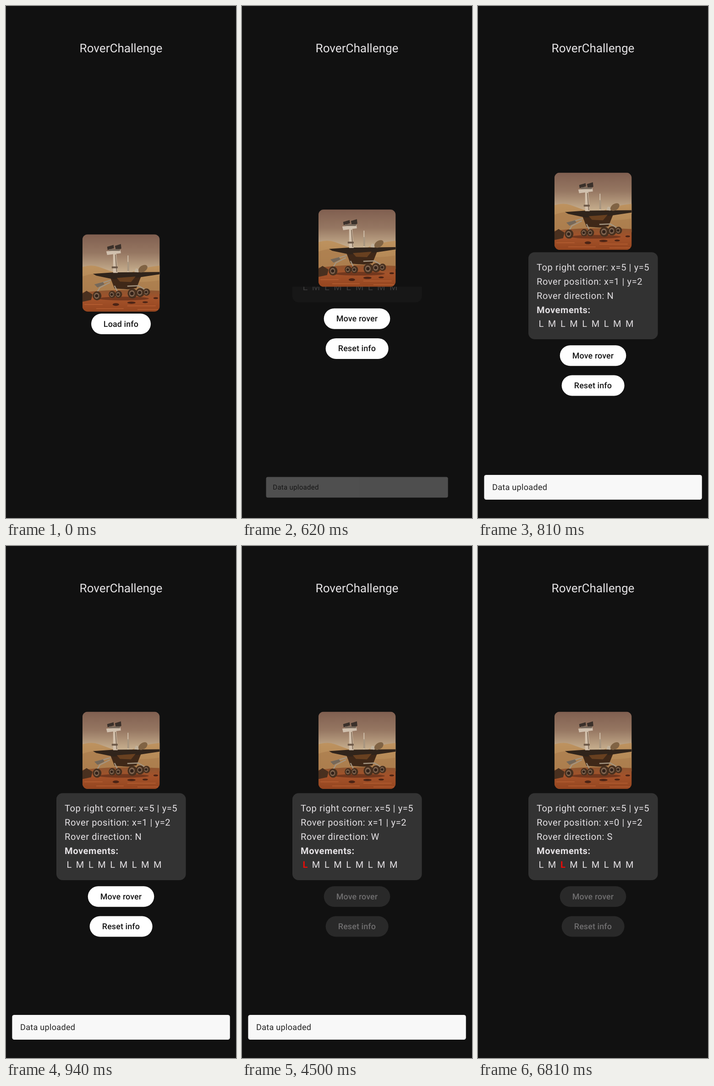
Animation of 502x1117 px, one loop 8000 ms. Source, as an HTML page:

```html
<!DOCTYPE html>
<html lang="en">
<head>
<meta charset="utf-8">
<title>Rover</title>
<style>
  html, body { margin: 0; width: 100%; height: 100%; overflow: hidden; background: #111; }
  svg { display: block; }
  text { font-family: Roboto, sans-serif; white-space: pre; text-rendering: geometricPrecision; }
  .title { font-size: 26.1px; fill: #e4e2e4; text-anchor: middle; }
  .info text { font-size: 20px; letter-spacing: .62px; fill: #e5e2e5; }
  .info .bold { font-weight: 700; }
  .info .active { font-weight: 700; fill: #ec0b08; }
  .button rect { fill: #fff; }
  .button text { font-size: 17.9px; font-weight: 500; letter-spacing: .12px; text-anchor: middle; fill: #161616; }
  .button.disabled rect { fill: #292929; }
  .button.disabled text { fill: #6f6e6f; }
  .snack rect { fill: #f8f8f8; }
  .snack text { font-size: 18px; letter-spacing: .32px; fill: #222; }
</style>
</head>
<body>
<svg width="100%" height="100%" viewBox="0 0 502 1117">
  <defs>
    <linearGradient id="sky" x2="0" y2="1">
      <stop offset="0" stop-color="#805f50"/>
      <stop offset=".45" stop-color="#967762"/>
      <stop offset="1" stop-color="#d0b996"/>
    </linearGradient>
    <linearGradient id="sand" x2="0" y2="1">
      <stop offset="0" stop-color="#bd925f"/>
      <stop offset="1" stop-color="#b08350"/>
    </linearGradient>
    <linearGradient id="soil" x2="0" y2="1">
      <stop offset="0" stop-color="#8d5530"/>
      <stop offset=".4" stop-color="#a4522a"/>
      <stop offset="1" stop-color="#94451f"/>
    </linearGradient>
    <clipPath id="frame"><rect width="168.5" height="168.5" rx="11.5"/></clipPath>
  </defs>

  <text class="title" x="251" y="101">RoverChallenge</text>

  <g id="photo"><g clip-path="url(#frame)">
    <rect width="169" height="90" fill="url(#sky)"/>
    <path d="M0 71Q20 65 36 71T70 83L105 84Q130 72 169 68V130H0Z" fill="url(#sand)"/>
    <path d="M0 92Q35 78 70 94T169 100V130H0Z" fill="#a87b4b" opacity=".6"/>
    <path d="M0 127Q60 118 169 123V169H0Z" fill="url(#soil)"/>
    <path d="M0 129L9 123L22 131L19 143L0 147Z" fill="#49301f"/>
    <g fill="#4c2415">
      <ellipse cx="73" cy="153" rx="7" ry="3"/><ellipse cx="107" cy="149" rx="9" ry="2.5"/>
      <ellipse cx="137" cy="148" rx="6" ry="2"/><ellipse cx="160" cy="139" rx="5" ry="2"/>
      <ellipse cx="90" cy="140" rx="55" ry="4" opacity=".55"/>
    </g>
    <g stroke="#c96d3c" stroke-width="1.5" opacity=".6">
      <path d="M4 153H44M30 162H90M98 156H160M120 164H165"/>
    </g>
    <!-- chassis, solar deck and suspension -->
    <path d="M60 92H128L118 117L100 120L70 118Z" fill="#3f2818"/>
    <path d="M23 86L66 83L169 82V87L122 94L68 98L30 90Z" fill="#30241b"/>
    <path d="M75 95L116 92L106 104L82 103Z" fill="#684020"/>
    <path d="M60 105L38 116L31 128M62 100L28 110M70 112L78 128M98 113L122 112L139 122" fill="none" stroke="#a39480" stroke-width="2.5"/>
    <path d="M26 109L45 104L48 109L33 116Z" fill="#75685a"/>
    <!-- mast, camera head, antenna and dish -->
    <path d="M67 42H74L77 84H67Z" fill="#d3c1ac"/>
    <path d="M72 44L75 82" stroke="#85705c" stroke-width="2"/>
    <rect x="64" y="70" width="13" height="4" fill="#6c5847"/>
    <path d="M52 37L83 34L84 41L54 45Z" fill="#d0c0ae"/>
    <path d="M54 27L68 23L69 30L55 34ZM71 25L84 21L85 31L73 35Z" fill="#3a302a"/>
    <path d="M58 34H82" stroke="#75675a" stroke-width="4"/>
    <path d="M99.500 46V82" stroke="#d8cbb8" stroke-width="1.6"/>
    <path d="M98 60H102V80H98Z" fill="#a89680"/>
    <path d="M113 82L117 74L125 77L122 83Z" fill="#c1b29d"/>
    <ellipse cx="132" cy="75" rx="11" ry="7" transform="rotate(-33 132 75)" fill="#806344"/>
    <g id="wheels"></g>
  </g></g>

  <svg id="reveal" class="info" width="502"><g id="panel">
    <rect x="110" y="9.200" width="282.500" height="189.800" rx="13.500" fill="#333"/>
    <text x="128" y="49.200">Top right corner: x=5 | y=5</text>
    <text x="128" y="80" id="position"></text>
    <text x="128" y="110.800" id="direction"></text>
    <text x="128" y="141.600" class="bold">Movements:</text>
    <g id="moves"></g>
  </g></svg>

  <g id="load" class="button"><rect x="186" width="130" height="45" rx="22.500"/><text x="251" y="28.600">Load info</text></g>
  <g id="move" class="button"><rect x="178.700" width="144.600" height="45" rx="22.500"/><text x="251" y="28.600">Move rover</text></g>
  <g id="reset" class="button"><rect x="182.600" width="137" height="45" rx="22.500"/><text x="251" y="28.600">Reset info</text></g>

  <g id="snack" class="snack">
    <rect x="13.400" y="1023" width="475.400" height="54" rx="4.500"/>
    <text x="31" y="1056">Data uploaded</text>
  </g>
</svg>
<script>
const LOOP = 8000, LOADED = 500, OPENED = 940;
const MOVES = [3750, 5310, 6810];
const PHOTO_X = 166.8, PHOTO = 168.5, PANEL = 208, GAP = 4.3;
const $ = id => document.getElementById(id);
const clamp = v => Math.min(1, Math.max(0, v));
const place = (id, x, y) => $(id).setAttribute('transform', `translate(${x} ${y})`);

function add(parent, tag, attributes, text = '') {
  const node = document.createElementNS('http://www.w3.org/2000/svg', tag);
  for (const key in attributes) node.setAttribute(key, attributes[key]);
  node.textContent = text;
  $(parent).append(node);
}

for (const [cx, cy, r] of [[65, 131, 8], [79, 131, 8], [140, 126, 8], [126, 127, 10], [109, 129, 11], [32, 134, 10]]) {
  add('wheels', 'ellipse', { cx, cy, rx: r * .95, ry: r, fill: '#47301f' });
  add('wheels', 'ellipse', { cx: cx - 1, cy, rx: r * .55, ry: r * .65, fill: '#806550' });
  add('wheels', 'circle', { cx: cx - 1, cy, r: r * .35, fill: '#33231a' });
}

let letterX = 132.5;
for (const letter of 'LMLMLMLMM') {
  add('moves', 'text', { x: letterX, y: 172.4 }, letter);
  letterX += letter === 'L' ? 20.35 : 27.05;
}
const letters = [...$('moves').children];

// Holds time on a grid of about 16 updates per second, in whole hundredths.
function snap(t, start) {
  const step = 62.8;
  const at = n => Math.round((start + n * step) / 10) * 10;
  const n = Math.round((t - start) / step);
  return at(n) <= t ? at(n) : at(n - 1);
}

// Critically damped spring from 0 to 1.
function spring(ms) {
  const u = Math.max(0, ms) * .02;
  return 1 - (1 + u) * Math.exp(-u);
}

function drawSnack(t) {
  const shown = clamp((snap(t, LOADED) - 520) / 150);
  const hidden = clamp((snap(t, MOVES[0]) - 4548) / 92);
  const opacity = t < MOVES[0] ? shown : 1 - hidden;
  const eased = opacity * opacity * (3 - 2 * opacity);
  $('snack').setAttribute('opacity', opacity);
  $('snack').setAttribute('transform',
    `translate(251 1050) scale(${.8 + .2 * eased}) translate(-251 -1050)`);
}

function draw(t) {
  const loaded = t >= LOADED;
  const open = t >= OPENED ? 1 : loaded ? spring(snap(t, LOADED) - 518) : 0;
  const height = PANEL * open;
  const top = loaded ? 465.5 - height / 2 : 498.2;
  const bottom = top + PHOTO;
  const buttonY = bottom + height + GAP;

  place('photo', PHOTO_X, top);
  $('reveal').setAttribute('y', bottom);
  $('reveal').setAttribute('height', height);
  $('reveal').style.display = height ? '' : 'none';
  place('panel', 0, height - PANEL);
  $('panel').setAttribute('opacity', open);

  place('load', 0, buttonY);
  place('move', 0, buttonY);
  place('reset', 0, buttonY + 65.2);
  $('load').style.display = loaded ? 'none' : '';
  for (const id of ['move', 'reset']) {
    $(id).style.display = loaded ? '' : 'none';
    $(id).classList.toggle('disabled', t >= MOVES[0]);
  }

  const done = MOVES.filter(time => t >= time).length;
  $('position').textContent = `Rover position: x=${done > 1 ? 0 : 1} | y=2`;
  $('direction').textContent = `Rover direction: ${'NWWS'[done]}`;
  letters.forEach((node, i) => node.classList.toggle('active', i === done - 1));
  drawSnack(t);
}

const start = performance.now();
function tick() {
  draw((performance.now() - start) % LOOP);
  requestAnimationFrame(tick);
}
tick();
</script>
</body>
</html>
```
